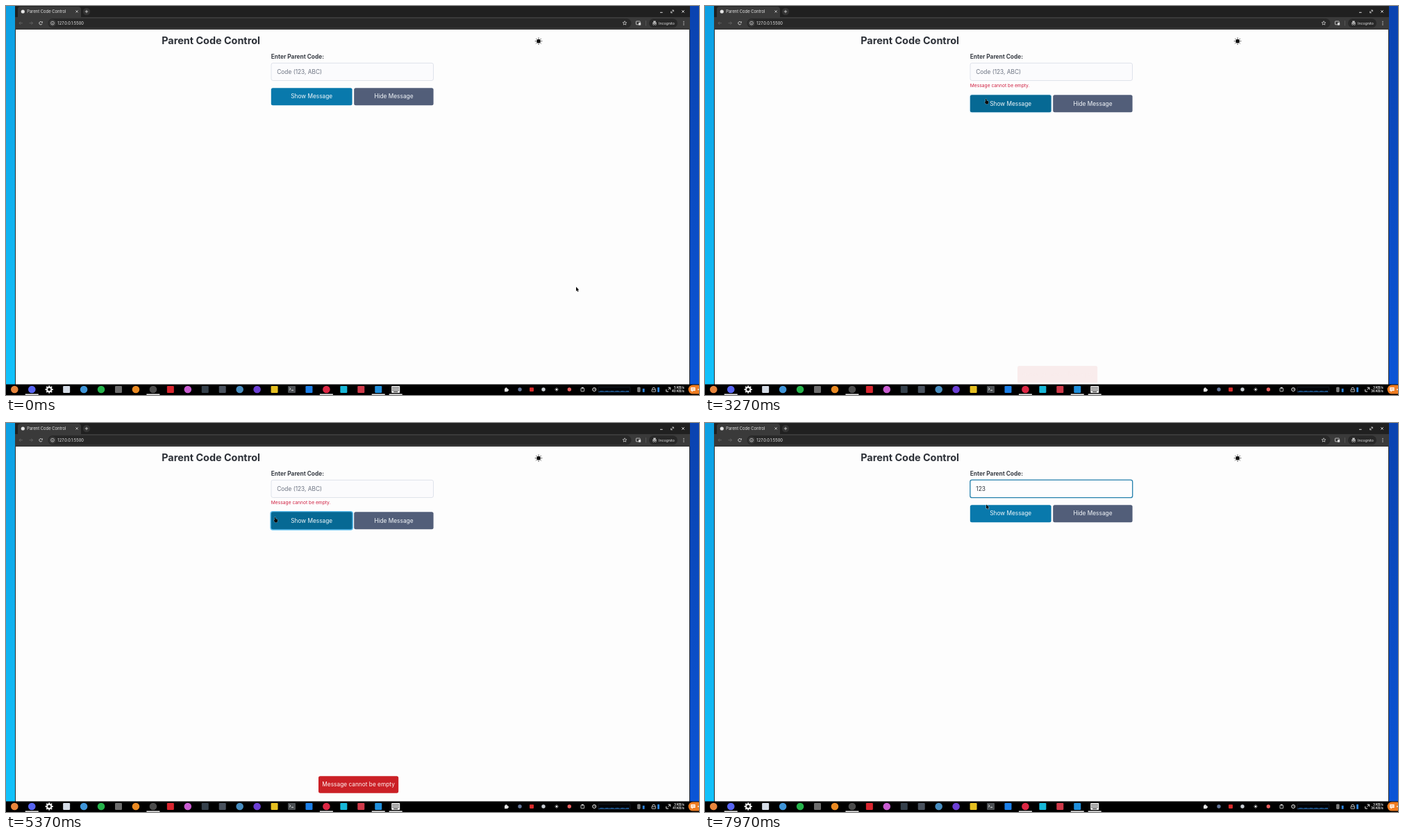
An HTML page with a canvas that plays this animation: 998 px wide and 561 px high, repeating every 8000 ms.

```html
<!DOCTYPE html>
<html lang="en">
<head>
<meta charset="utf-8">
<title>Parent Code Control</title>
<style>
html, body { margin: 0; width: 100%; height: 100%; overflow: hidden; background: #000; }
canvas { display: block; width: 998px; height: 561px; }
</style>
</head>
<body>
<canvas id="stage" width="998" height="561"></canvas>
<script>
const ctx = document.getElementById('stage').getContext('2d');
const LOOP = 8000;
const SANS = 'Inter, sans-serif';

const SHOWN = 3225, TOAST_IN = 3245, TOAST_OUT = 5800, FOCUS = 6300;
const KEYS = [6740, 6980, 7200];

// time, x, y of the pointer tip
const PATH = [
  [0, 821, 405], [1000, 821, 405], [1970, 452, 276.5], [2750, 404, 129], [3270, 404, 134],
  [4050, 394, 136], [4600, 386, 137], [5300, 386, 137], [5940, 410, 105], [6300, 419, 97],
  [7350, 419, 97], [7970, 405, 117.5], [8000, 405, 117.5]
];

const clamp = v => Math.max(0, Math.min(1, v));
const mix = (a, b, p) => a + (b - a) * p;
const smooth = p => p * p * (3 - 2 * p);

// CSS "ease" curve
function ease(x) {
  x = clamp(x);
  let lo = 0, hi = 1, s = x;
  for (let i = 0; i < 18; i++) {
    s = (lo + hi) / 2;
    const bx = 3 * s * (1 - s) ** 2 * 0.25 + 3 * s * s * (1 - s) * 0.25 + s ** 3;
    if (bx < x) lo = s; else hi = s;
  }
  return 3 * s * (1 - s) ** 2 * 0.1 + 3 * s * s * (1 - s) + s ** 3;
}

function rect(x, y, w, h, color) {
  ctx.fillStyle = color;
  ctx.fillRect(x, y, w, h);
}
function round(x, y, w, h, r, fill, stroke, lw = 1) {
  ctx.beginPath();
  ctx.roundRect(x, y, w, h, r);
  if (fill) { ctx.fillStyle = fill; ctx.fill(); }
  if (stroke) { ctx.strokeStyle = stroke; ctx.lineWidth = lw; ctx.stroke(); }
}
function dot(x, y, r, color) {
  ctx.beginPath();
  ctx.arc(x, y, r, 0, 7);
  ctx.fillStyle = color;
  ctx.fill();
}
function ring(x, y, r, color, lw = 0.8, from = 0, to = 7) {
  ctx.beginPath();
  ctx.arc(x, y, r, from, to);
  ctx.strokeStyle = color;
  ctx.lineWidth = lw;
  ctx.stroke();
}
function line(points, color, lw = 0.8) {
  ctx.beginPath();
  points.forEach(([x, y], i) => i ? ctx.lineTo(x, y) : ctx.moveTo(x, y));
  ctx.strokeStyle = color;
  ctx.lineWidth = lw;
  ctx.stroke();
}
function poly(points, fill, stroke, lw) {
  ctx.beginPath();
  points.forEach(([x, y], i) => i ? ctx.lineTo(x, y) : ctx.moveTo(x, y));
  ctx.closePath();
  if (stroke) { ctx.strokeStyle = stroke; ctx.lineWidth = lw; ctx.stroke(); }
  ctx.fillStyle = fill;
  ctx.fill();
}
function text(s, x, y, size, color, weight = 400, align = 'left') {
  ctx.font = `${weight} ${size}px ${SANS}`;
  ctx.textAlign = align;
  ctx.fillStyle = color;
  ctx.fillText(s, x, y);
}
function rays(x, y, r0, r1, n, color, lw) {
  for (let i = 0; i < n; i++) {
    const c = Math.cos(i * 2 * Math.PI / n), s = Math.sin(i * 2 * Math.PI / n);
    line([[x + c * r0, y + s * r0], [x + c * r1, y + s * r1]], color, lw);
  }
}
function star(x, y, r, color) {
  const pts = Array.from({ length: 10 }, (_, i) => {
    const a = i * Math.PI / 5 - Math.PI / 2, q = i % 2 ? r * 0.45 : r;
    return [x + q * Math.cos(a), y + q * Math.sin(a)];
  });
  line([...pts, pts[0]], color, 0.7);
}
function shade(x, w, top, bottom) {
  const g = ctx.createLinearGradient(0, 0, 0, 546);
  g.addColorStop(0, top);
  g.addColorStop(1, bottom);
  rect(x, 0, w, 546, g);
}

function drawDesktop() {
  shade(0, 14, '#0d9fe3', '#12c2fb');
  shade(984, 14, '#0a43b0', '#0b55d6');
  rect(13, 0, 972, 546, '#2b2b2b');
}

function drawBrowser() {
  const ink = '#dcdcdc', dim = '#6a6a6a';
  rect(13, 0, 972, 17, '#202020');
  round(17, 1, 91, 20, 4, '#3a3a3a');
  rect(13, 16, 972, 17.5, '#3a3a3a');
  dot(24.3, 8, 2.6, '#e6e6e6');
  text('Parent Code Control', 30.3, 10, 5.85, '#e4e4e4');
  line([[100.5, 6.3], [103.7, 9.5]], ink);
  line([[103.7, 6.3], [100.5, 9.5]], ink);
  dot(116, 8, 5.2, '#333');
  line([[113.8, 8], [118.2, 8]], ink);
  line([[116, 5.8], [116, 10.2]], ink);

  line([[942, 9.3], [945.6, 9.3]], ink, 1);
  line([[957.8, 9.5], [961.2, 6.2]], ink, 0.7);
  line([[959.2, 6], [961.4, 6], [961.4, 8.2]], ink, 0.8);
  line([[957.6, 7.6], [957.6, 9.8], [959.8, 9.8]], ink, 0.8);
  line([[973.4, 6.2], [976.8, 9.6]], ink, 1);
  line([[976.8, 6.2], [973.4, 9.6]], ink, 1);

  for (const [x, d] of [[21.5, -1], [36, 1]]) {
    line([[x - 2.4, 24.7], [x + 2.4, 24.7]], dim);
    line([[x + d * 0.4, 22.5], [x + d * 2.5, 24.7], [x + d * 0.4, 26.9]], dim);
  }
  ring(50, 24.7, 2.2, ink, 0.9, 0.4, 5.6);
  poly([[50.7, 24.2], [52.8, 24.2], [52.8, 22]], ink);

  round(60.5, 18, 840, 13.4, 6.7, '#282828');
  dot(67, 24.7, 5, '#3a3a3a');
  ring(67, 24.7, 2.4, ink, 0.7);
  line([[67, 24.3], [67, 26.2]], ink, 0.7);
  text('127.0.0.1:5500', 74.3, 26.6, 5.75, '#e8e8e8');
  star(891, 24.7, 3, ink);
  round(907.4, 22, 5.8, 4.8, 0.6, null, ink, 0.8);
  rect(911, 24.2, 3.2, 3.4, ink);
  rect(921, 21, 0.6, 7.5, '#666');
  round(926, 18.3, 41, 12.8, 6.4, '#282828');
  rect(931, 24, 6, 0.9, ink);
  rect(932.3, 21.6, 3.4, 2, ink);
  ring(932.6, 26.4, 1, ink, 0.7);
  ring(935.4, 26.4, 1, ink, 0.7);
  text('Incognito', 940, 26.5, 5.2, '#e4e4e4');
  for (const y of [22.4, 24.7, 27]) dot(976, y, 0.65, ink);
}

function drawButton(x, y, w, label, fill, glow) {
  if (glow > 0) round(x - 0.5, y - 0.5, w + 1, 26, 2.8, null, `rgba(2,154,232,${0.65 * glow})`, 1.8);
  round(x, y, w, 25, 2.5, fill);
  text(label, x + w / 2, y + 15.2, 8.32, '#f4f8fb', 400, 'center');
}

function drawPage(t) {
  const typed = KEYS.filter(k => t >= k).length;
  const failed = t >= SHOWN && !typed;
  const focused = t >= FOCUS;

  rect(14, 34, 970, 512, '#fdfdfd');
  text('Parent Code Control', 224.2, 55.4, 14.4, '#2d3138', 700);
  dot(767, 50.7, 2.9, '#111');
  rays(767, 50.7, 3.9, 5.1, 8, '#111', 1);
  text('Enter Parent Code:', 381.8, 75.6, 8.32, '#373c44', 700);

  const glow = focused ? smooth(clamp((t - FOCUS) / 200)) : 0;
  round(382, 82.3, 233.5, 25.2, 2.5, '#fbfbfd', '#d3d8e3', 0.7);
  if (glow) {
    ctx.globalAlpha = glow;
    round(381.8, 82.1, 233.9, 25.6, 2.7, '#fdfdfe', '#2380ac', 1.3);
    ctx.globalAlpha = 1;
  }
  if (typed) text('123'.slice(0, typed), 390.3, 97.8, 8.32, '#2f343c');
  else text('Code (123, ABC)', 390.3, 97.8, 8.32, '#6b7280');

  const lastKey = typed ? KEYS[typed - 1] : FOCUS;
  if (focused && (t - lastKey) % 1000 < 500) {
    ctx.font = `400 8.32px ${SANS}`;
    const w = typed ? ctx.measureText('123'.slice(0, typed)).width : 0;
    rect(390.2 + w, 90, 0.7, 10, '#2f343c');
  }

  if (failed) text('Message cannot be empty.', 381.8, 117.3, 6.7, '#cf1f40');
  const y = failed ? 128.3 : 118.2;
  const over = t >= 2700 && t < FOCUS;
  const hot = over ? smooth(clamp((t - 2700) / 200)) : 0;
  const fill = `rgb(${mix(9, 6, hot)},${mix(121, 105, hot)},${mix(172, 148, hot)})`;
  const press = t >= SHOWN && !focused ? smooth(clamp((t - SHOWN) / 200)) : 0;
  drawButton(381.8, y, 116.8, 'Show Message', fill, press);
  drawButton(501.2, y, 114.4, 'Hide Message', '#525e79', 0);

  drawToast(t);
}

function drawToast(t) {
  const a = ease((t - TOAST_IN) / 300) * (1 - ease((t - TOAST_OUT) / 300));
  if (a < 0.004) return;
  ctx.globalAlpha = a;
  const y = 509.2 + 10.6 * (1 - a);
  round(450, y, 115.2, 24.5, 2.6, '#cb2026');
  text('Message cannot be empty', 507.6, y + 15.2, 8.32, '#fff4f4', 400, 'center');
  ctx.globalAlpha = 1;
}

// shape (c = circle, s = square), main colour; one every 24.95 px
const APPS = [
  'c#e8853c', 'c#5865f2', 'gear', 's#d5dce6', 'c#3f95d8', 'c#25b34b', 's#6d6d6d', 'c#ea8a22',
  'c#4b4b4b', 's#d9252f', 'c#c85cd0', 's#35404b', 's#49525e', 'c#478cbf', 'c#6c3fd4', 's#e5bf20',
  'term', 's#1b7fe8', 'c#dc2744', 's#17b7d8', 's#d03a4a', 's#1f8fdc', 'keys'
];
const RUNNING = [1, 8, 18, 21, 22];

function drawApp(kind, x, y) {
  if (kind === 'gear') {
    rays(x, y, 3, 5.6, 8, '#eee', 1.9);
    ring(x, y, 3.2, '#eee', 2.2);
  } else if (kind === 'term') {
    round(x - 5.5, y - 5, 11, 10, 1, '#4c5054');
    line([[x - 3.5, y - 2.5], [x - 1.5, y - 0.7], [x - 3.5, y + 1]], '#eee', 0.9);
    line([[x - 0.5, y + 1.2], [x + 2.5, y + 1.2]], '#eee', 0.9);
  } else if (kind === 'keys') {
    round(x - 6, y - 5, 12, 10, 1, '#eee');
    for (let r = 0; r < 3; r++)
      for (let c = 0; c < 5; c++) rect(x - 4.7 + c * 2, y - 3.5 + r * 2.2, 1.2, 1.2, '#222');
    rect(x - 3, y + 2.9, 6, 1, '#222');
  } else if (kind[0] === 'c') dot(x, y, 5.3, kind.slice(1));
  else round(x - 5, y - 5, 10, 10, 1.2, kind.slice(1));
}

function drawTaskbar(t) {
  const y = 553, ink = '#e6e6e6';
  rect(0, 545.6, 998, 15.4, '#000');
  APPS.forEach((kind, i) => drawApp(kind, 12.3 + i * 24.95, y));
  for (const i of RUNNING) rect(2.8 + i * 24.95, 559.4, 19, 1.6, '#e2e2e2');

  rect(718, 551.6, 4.6, 4.6, ink);
  dot(720.3, 551.4, 1.2, ink);
  dot(722.8, 553.8, 1.2, ink);
  dot(740, y, 2.7, '#66779a');
  round(754, 550.3, 6, 5.6, 0.8, '#d92a2a');
  dot(774, y, 2.7, '#c9ced4');
  dot(793, y, 1.5, ink);
  rays(793, y, 2, 2.9, 8, ink, 0.6);
  dot(811.3, y, 2.7, '#e8605f');
  round(828, 551, 4.6, 4.8, 0.5, null, ink, 0.8);
  rect(829, 549.8, 2.6, 1.6, ink);
  ring(847.2, y, 2.5, ink, 1);
  line([[847.2, 551.5], [847.2, y], [848.5, y]], ink, 0.7);

  round(852.8, 549.6, 46, 7.4, 0.5, '#020408', '#252b33', 0.6);
  for (let i = 0; i < 22; i++) {
    const h = 0.8 + 0.9 * Math.abs(Math.sin(i * 2.3));
    rect(853.4 + i * 2, 556.6 - h, 1.6, h, '#2878c8');
  }
  round(909.6, 550, 3.6, 6.4, 0.4, '#777', '#bbb', 0.5);
  rect(916.8, 551.8, 2.8, 5, '#2f86e0');
  round(930, 553.2, 5.6, 3, 0.5, null, ink, 0.8);
  line([[930.5, 553], [931.6, 550.4], [934, 550.4], [935.1, 553]], ink, 0.8);
  rect(938.2, 550, 2.8, 6.8, '#2f86e0');
  line([[953.6, 550.2], [956.8, 550.2], [956.8, 553.4]], ink, 1);
  line([[950.8, 552.8], [950.8, 556], [954, 556]], ink, 1);
  line([[953.5, 553.6], [956.4, 550.6]], ink, 0.9);

  const up = t < 1000 ? 5 : 3;
  const down = t < 1000 ? 40 : t < 3900 ? 36 : t < 6500 ? 41 : 36;
  text(up + ' KB/s', 976.8, 552.2, 4.7, '#f2f2f2', 600, 'right');
  text(down + ' KB/s', 976.8, 557.4, 4.7, '#f2f2f2', 600, 'right');

  round(982.6, 546.6, 20, 13, 6.5, '#ef7d22');
  round(986.2, 550, 6.4, 5, 0.6, '#fff');
  rect(987.2, 551.3, 4.4, 0.6, '#ef7d22');
  rect(987.2, 552.9, 4.4, 0.6, '#ef7d22');
  poly([[987.6, 554.8], [989.8, 554.8], [987.6, 556.8]], '#fff');
  rect(996, 552.4, 2, 1.2, '#fff');
}

function pointer(t) {
  const i = Math.max(1, PATH.findIndex(p => p[0] > t));
  const [a, b] = [PATH[i - 1], PATH[i]];
  const p = smooth((t - a[0]) / (b[0] - a[0]));
  return [mix(a[1], b[1], p), mix(a[2], b[2], p)];
}

function drawPointer(t) {
  const [x, y] = pointer(t);
  const top = t >= SHOWN && t < KEYS[0] ? 128.3 : 118.2;
  const wide = x > 381.8 && x < 615.6;
  if (wide && y > 82 && y < 107.6) {
    const c = '#444';
    line([[x, y - 3.2], [x, y + 3.2]], c, 0.8);
    for (const s of [-1, 1]) line([[x - 1.7, y + s * 3.6], [x, y + s * 3.1], [x + 1.7, y + s * 3.6]], c, 0.8);
  } else if (wide && y > top && y < top + 25) {
    ctx.lineJoin = 'round';
    poly([[x, y], [x + 1.3, y], [x + 1.5, y + 2.4], [x + 4.2, y + 3.2], [x + 4.4, y + 5.4],
      [x + 3.4, y + 7.6], [x + 0.7, y + 7.6], [x - 1.2, y + 4.6], [x - 0.6, y + 3.8], [x, y + 4.4]],
      '#0a0a0a', 'rgba(255,255,255,.55)', 0.7);
  } else {
    poly([[x, y], [x, y + 6.2], [x + 1.4, y + 5], [x + 2.4, y + 7.2], [x + 3.4, y + 6.8],
      [x + 2.5, y + 4.6], [x + 4.3, y + 4.5]], '#0a0a0a', 'rgba(255,255,255,.7)', 0.8);
  }
}

const start = performance.now();
function frame() {
  const t = (performance.now() - start) % LOOP;
  drawDesktop();
  drawBrowser();
  drawPage(t);
  drawTaskbar(t);
  drawPointer(t);
  requestAnimationFrame(frame);
}
frame();
</script>
</body>
</html>
```
